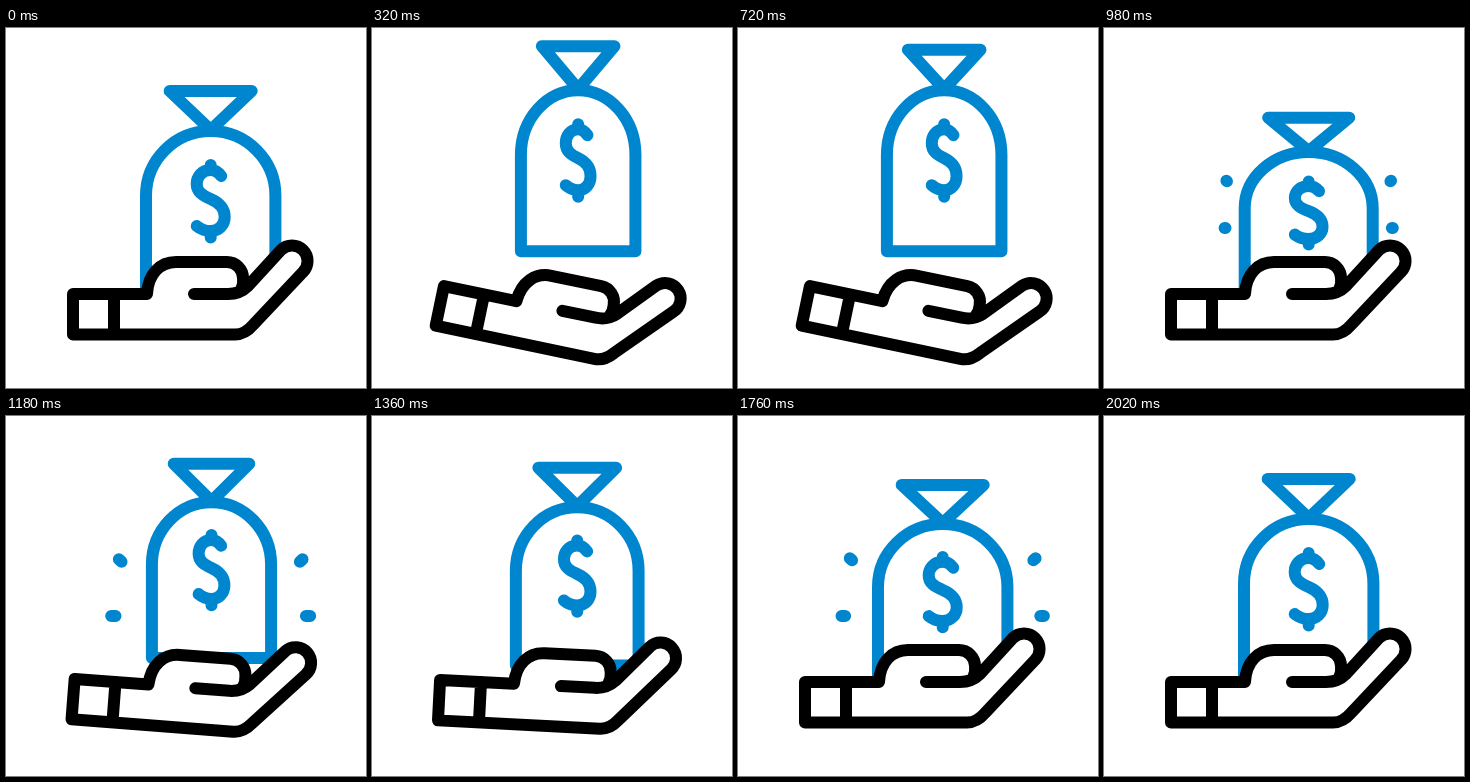
These frames come from a looping animation (360x360 px, 2220 ms). An HTML page with a canvas:

```html
<!DOCTYPE html>
<html lang="en">
<head>
<meta charset="utf-8">
<title>Money bag in hand</title>
<style>
html, body { margin: 0; width: 100%; height: 100%; overflow: hidden; background: #fff; }
canvas { display: block; width: 360px; height: 360px; }
</style>
</head>
<body>
<canvas id="stage" width="360" height="360"></canvas>
<script>
const ctx = document.getElementById('stage').getContext('2d');
const LOOP = 2220, STEP = 20;
const BLUE = '#0086ce', LINE = 12;
const BASE = 264, MID = 204.7;

const linear = t => t;
const quadOut = t => 1 - (1 - t) ** 2;
const quadIn = t => t * t;
const cubicOut = t => 1 - (1 - t) ** 3;
const cubicIn = t => t ** 3;

// Keys are [time, value, easing into this key].
function track(keys) {
  return time => {
    const i = keys.findIndex(k => k[0] > time);
    if (i === 0) return keys[0][1];
    if (i < 0) return keys[keys.length - 1][1];
    const [t0, v0] = keys[i - 1], [t1, v1, ease = linear] = keys[i];
    return v0 + (v1 - v0) * ease((time - t0) / (t1 - t0));
  };
}

const hops = (first, second) => track([
  [200, 0], [520, first, cubicOut], [840, 0, cubicIn],
  [980, 0], [1260, second, quadOut], [1420, 0, quadIn]
]);
const lift = hops(54, 24);
const tilt = hops(15.6, 4.8);
const width = track([
  [200, 1], [320, 0.885, quadOut], [520, 0.872, quadOut], [720, 0.885, quadIn],
  [840, 1, quadIn], [960, 1], [1260, 0.915, quadOut], [1420, 1, quadIn]
]);
const height = track([
  [840, 1], [920, 0.79, quadOut], [1260, 0.97, cubicOut], [1420, 0.99],
  [1490, 0.85, quadOut], [1990, 1, quadOut]
]);
const knotGap = track([
  [200, 40], [320, 44, quadOut], [520, 42.5], [720, 40.5], [840, 40],
  [920, 31, quadOut], [1260, 38.5, cubicOut], [1420, 40],
  [1490, 36, quadOut], [1990, 40, quadOut]
]);

const dollar = new Path2D(`M10.5 -25 Q6 -31 0 -31 C-9 -31 -14 -24 -14 -17
  C-14 -9 -8 -5.5 0 -2 C9 2 14 7 14 16 C14 24 8 30 0 30 Q-8 30 -14 25
  M0 -36 V-31 M0 30 V36.5`);
const handShape = new Path2D(`M67 266 H141 C142 246 154 234 170 234 H221
  A16 16 0 0 1 237 250 L242 258 L275 222 A15.5 15.5 0 0 1 297 244
  L247 297 Q239 306.5 229 306.5 H67 Z`);
const handLines = new Path2D(`M188 266 H222 Q234 266 242 258
  L275 222 A15.5 15.5 0 0 1 297 244 L247 297 Q239 306.5 229 306.5
  H67 V266 H141 C142 246 154 234 170 234 H221
  A16 16 0 0 1 237 250 Q238 256 235 262 M108 266 V306.5`);

function drawBag(time) {
  const sx = width(time), sy = height(time), up = lift(time);
  const cx = MID + up * 0.036, bottom = BASE - up;
  const top = bottom - 161 * sy, half = 64.7 * sx, shoulder = top + 64.7 * sy;
  const knotY = top - knotGap(time), knotHalf = 41 * sx;

  ctx.strokeStyle = BLUE;
  ctx.beginPath();
  ctx.moveTo(cx - half, bottom);
  ctx.lineTo(cx - half, shoulder);
  ctx.ellipse(cx, shoulder, half, 64.7 * sy, 0, Math.PI, 2 * Math.PI);
  ctx.lineTo(cx + half, bottom);
  ctx.closePath();
  ctx.moveTo(cx - knotHalf, knotY);
  ctx.lineTo(cx + knotHalf, knotY);
  ctx.lineTo(cx, top - 1);
  ctx.closePath();
  ctx.stroke();

  const sign = new Path2D();
  sign.addPath(dollar, new DOMMatrix([sx, 0, 0, sy, cx, bottom - 91 * sy]));
  ctx.stroke(sign);
}

function drawSparks(time, start) {
  const t = (time - start) / 350;
  if (t <= 0 || t >= 1) return;
  const head = 1 - (1 - t) ** 1.8, tail = t;
  ctx.strokeStyle = BLUE;
  ctx.lineWidth = LINE * Math.min(1, (1 - t) / 0.15);
  ctx.beginPath();
  for (const side of [-1, 1]) {
    for (const [x, y, dx, dy] of [[82, 200, 21, 0], [81, 154, 13, -13]]) {
      ctx.moveTo(MID + side * (x + dx * tail), y + dy * tail);
      ctx.lineTo(MID + side * (x + dx * head + 0.01), y + dy * head);
    }
  }
  ctx.stroke();
  ctx.lineWidth = LINE;
}

function drawHand(time) {
  ctx.save();
  ctx.translate(108, 286);
  ctx.rotate(tilt(time) * Math.PI / 180);
  ctx.translate(-108, -286);
  ctx.fillStyle = '#fff';
  ctx.strokeStyle = '#000';
  ctx.fill(handShape);
  ctx.stroke(handLines);
  ctx.restore();
}

function draw(now) {
  const time = Math.floor((now % LOOP) / STEP) * STEP;
  ctx.fillStyle = '#fff';
  ctx.fillRect(0, 0, 360, 360);
  ctx.lineWidth = LINE;
  ctx.lineCap = ctx.lineJoin = 'round';
  drawBag(time);
  drawSparks(time, 960);
  drawSparks(time, 1500);
  drawHand(time);
}

let origin;
function tick(now) {
  origin ??= now;
  draw(now - origin);
  requestAnimationFrame(tick);
}
draw(0);
requestAnimationFrame(tick);
</script>
</body>
</html>
```
